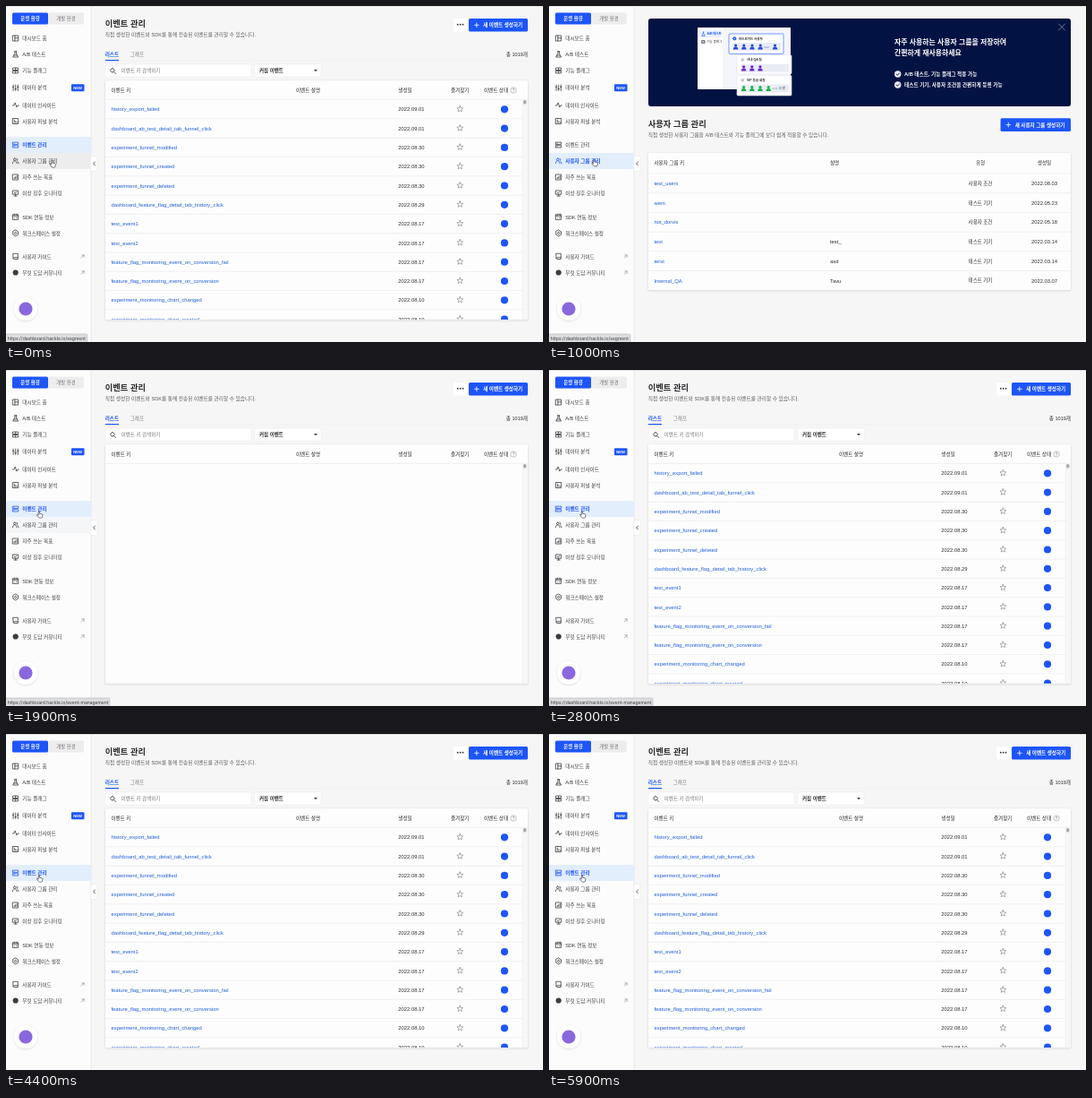
Animation, 600 px wide and 375 px high, one loop 6 s. Source, as an HTML page:

```html
<!DOCTYPE html>
<html lang="ko">
<head>
<meta charset="utf-8">
<style>
html, body { margin: 0; width: 100%; height: 100%; overflow: hidden; background: #f6f6f6; }
svg { display: block; width: 100vw; height: 100vh; }
text { font-family: "Liberation Sans", "Noto Sans CJK KR", "Noto Sans CJK", sans-serif; white-space: pre; }
.ui { font-family: Inter, sans-serif; }
.line { fill: none; stroke: currentColor; stroke-width: .8; stroke-linecap: round; stroke-linejoin: round; }
</style>
</head>
<body>
<svg id="stage" viewBox="0 0 600 375" xmlns="http://www.w3.org/2000/svg"></svg>
<script>
const BLUE = '#1d55f8', LINK = '#1f5fd8', INK = '#2b2b2f', GREY = '#77777c', NAVY = '#021242';
const stage = document.getElementById('stage');

const rect = (x, y, w, h, fill, r = 0, extra = '') =>
  `<rect x="${x}" y="${y}" width="${w}" height="${h}" rx="${r}" fill="${fill}" ${extra}/>`;
const dot = (x, y, r, fill, extra = '') => `<circle cx="${x}" cy="${y}" r="${r}" fill="${fill}" ${extra}/>`;
const line = (d, color, width = .8, extra = '') =>
  `<path class="line" d="${d}" style="color:${color};stroke-width:${width}" ${extra}/>`;
// y is the vertical middle of the text
const text = (x, y, s, { size = 5.65, fill = INK, bold = false, anchor = 'start', extra = '' } = {}) =>
  `<text x="${x}" y="${y + size * .36}" font-size="${size}" fill="${fill}" font-weight="${bold ? 700 : 400}" text-anchor="${anchor}" ${extra}>${s}</text>`;
const group = (id, content) => `<g id="${id}">${content}</g>`;
const rule = (x1, x2, y, color = '#e6e6e8') => line(`M${x1} ${y}H${x2}`, color, .6);
const plus = (x, y) => line(`M${x - 2.3} ${y}h4.6M${x} ${y - 2.3}v4.6`, '#fff', .8);

// Icon paths are centred on 0,0
const icons = {
  home: 'M-3-3h6v6h-6zM-.8-3v6M-.8-.2h3.8',
  flask: 'M-1.2-3.2h2.4M-.8-3.2v2.4L-3 3h6L.8-.8v-2.4M-1.8 1h3.6',
  flag: 'M-2.9-2.9h5.8v2.4h-5.8zM-2.9.5h5.8v2.4h-5.8zM0-2.9v2.4M0 .5v2.4',
  sliders: 'M-2.6-3.2v6.4M0-3.2v6.4M2.6-3.2v6.4M-3.4-1h1.6M-.8 1.2h1.6M1.8-1h1.6',
  pulse: 'M-3.3.5h1.5l1.3-3 1.7 5 1-2h1.4',
  chart: 'M-3-3h6v6h-6zM-1.4 1.6v-3M.1 1.6v-1.5M1.6 1.6v-.6',
  event: 'M-3-2.9h6v2.3h-6zM-3 .7h6v2.3h-6zM-1.7-1.8h.1M-1.7 1.8h.1',
  users: 'M-1-3a1.3 1.3 0 1 1-.01 0M-3.3 2.7c0-4 4.6-4 4.6 0M1.2-2.8a1.3 1.3 0 0 1 .3 2.4M2.1.3q1.3.7 1.3 2.4',
  goal: 'M-3-3h6v6h-6zM-1.4 1.5v-1M0 1.5v-2M1.5 1.5v-3',
  monitor: 'M-3-3h6v4.2h-6zM-1.6 3h3.2M0 1.2v1.8M-1.5-.8l1 .7 1.7-1.4',
  sdk: 'M-3-2.7h6v5.6h-6zM-3-1.2h6M-1.4-3.4v1.3M1.4-3.4v1.3M-1.5.8h.2M.8.8h.7',
  gear: 'M0-3.4L2.9-1.7v3.4L0 3.4-2.9 1.7v-3.4zM0-1.2a1.2 1.2 0 1 1-.01 0',
  book: 'M-2.6-3.2h5.2v6.2h-4.4a.9.9 0 0 1-.8-.9zM-2.6 2q0-.8.8-.8h4.4'
};
const menu = [
  [36, '대시보드 홈', 'home'], [54, 'A/B 테스트', 'flask'], [72, '기능 플래그', 'flag'],
  [91.3, '데이터 분석', 'sliders'], [110.5, '데이터 인사이트', 'pulse'], [128.5, '사용자 퍼널 분석', 'chart'],
  [155, '이벤트 관리', 'event'], [173, '사용자 그룹 관리', 'users'], [191, '자주 쓰는 목표', 'goal'],
  [209, '이상 징후 모니터링', 'monitor'], [235.5, 'SDK 연동 정보', 'sdk'], [253.5, '워크스페이스 설정', 'gear'],
  [279.5, '사용자 가이드', 'book'], [297.5, '무릿 도담 커뮤니티', '']
];

function menuItem([y, label, icon], i) {
  const mark = icon
    ? `<path class="line" transform="translate(10.7 ${y})" d="${icons[icon]}"/>`
    : dot(10.7, y, 3.1, 'currentColor');
  const arrow = y > 270 ? line(`M84 ${y + 1.6}l3.2-3.2M84.6 ${y - 1.6}h2.6v2.6`, '#88888c', .6) : '';
  return `<g id="item${i}" color="#3c3c40">${rect(0, y - 9, 95, 18, 'transparent')}${mark}` +
    text(18.3, y, label, { size: 5.6, fill: 'currentColor' }) + arrow + '</g>';
}

function sidebar() {
  return rect(0, 0, 95, 375, '#fcfcfc') + line('M95 0V375', '#e3e3e5', .7) +
    rect(47, 7.5, 40, 13, '#ededee', 1.5) + rect(7, 7.5, 40, 13, BLUE, 1.5) +
    text(27, 14, '운영 환경', { size: 5.4, fill: '#fff', bold: true, anchor: 'middle' }) +
    text(67, 14, '개발 환경', { size: 5.4, fill: GREY, anchor: 'middle' }) +
    menu.map(menuItem).join('') +
    rect(73, 87.3, 14.5, 8, BLUE, 1) +
    text(80.2, 91.3, 'NEW', { size: 4.2, fill: '#fff', bold: true, anchor: 'middle' }) +
    rect(94.6, 167.5, 7.4, 17, '#fff', 1.5, 'stroke="#e3e3e5" stroke-width=".5"') +
    line('M99.4 174l-1.8 2 1.8 2', '#333', .8) +
    dot(22, 338, 13, '#fff', 'filter="url(#shadow)"') + dot(22, 338, 7.6, '#8a67df');
}

function button(x, y, w, h, label, gap) {
  return rect(x, y, w, h, BLUE, 1.6) + plus(x + 8.8, y + h / 2) +
    text(x + gap, y + h / 2, label, { size: 5.55, fill: '#fff', bold: true });
}

const star = (x, y) => {
  const points = Array.from({ length: 10 }, (_, k) => {
    const a = k * Math.PI / 5 - Math.PI / 2, r = k % 2 ? 1.65 : 3.6;
    return `${(x + r * Math.cos(a)).toFixed(2)} ${(y + r * Math.sin(a)).toFixed(2)}`;
  });
  return line(`M${points.join('L')}Z`, '#77777c', .6);
};

const events = [
  ['history_export_failed', '09.01'], ['dashboard_ab_test_detail_tab_funnel_click', '09.01'],
  ['experiment_funnel_modified', '08.30'], ['experiment_funnel_created', '08.30'],
  ['experiment_funnel_deleted', '08.30'], ['dashboard_feature_flag_detail_tab_history_click', '08.29'],
  ['test_event1', '08.17'], ['test_event2', '08.17'],
  ['feature_flag_monitoring_event_on_conversion_fail', '08.17'],
  ['feature_flag_monitoring_event_on_conversion', '08.17'],
  ['experiment_monitoring_chart_changed', '08.10'], ['experiment_monitoring_chart_created', '08.10']
];

function eventRow([key, date], i) {
  const y = 115.3 + i * 21.3;
  return text(117.5, y, key, { size: 5.85, fill: LINK }) +
    text(438.3, y, '2022.' + date, { size: 5.85 }) +
    star(507.3, y - .3) + dot(557, y, 4.1, BLUE) + rule(111, 577, y + 10.6);
}

function eventPage() {
  const heads = [[117.5, '이벤트 키'], [324, '이벤트 설명'], [438.3, '생성일'], [497, '즐겨찾기'], [534, '이벤트 상태']];
  return text(110.7, 20, '이벤트 관리', { size: 9.3, bold: true }) +
    text(110.7, 32, '직접 생성한 이벤트와 SDK를 통해 전송된 이벤트를 관리할 수 있습니다.', { size: 5.68, fill: '#5c5c61' }) +
    rect(500, 14, 15, 14.5, '#fff', 1.6) + [504.7, 507.6, 510.5].map(x => dot(x, 20.7, .9, INK)).join('') +
    button(517, 14, 66, 14.5, '새 이벤트 생성하기', 16.2) +
    text(110.7, 54, '리스트', { size: 5.6, fill: BLUE, bold: true }) +
    text(138.8, 54, '그래프', { size: 5.5, fill: GREY }) +
    rule(111, 583, 61, '#ececee') + rect(111, 60, 15, 1.2, BLUE) +
    text(583, 54, '총 1019개', { size: 5.6, anchor: 'end' }) +
    rect(111, 65, 163, 14, '#fff', 1.5, 'stroke="#ebebed" stroke-width=".5"') +
    line('M119-.2m0 69.8a2.2 2.2 0 1 1-.01 0M120.7 73.5l2 2', INK, .8) +
    text(128.8, 72, '이벤트 키 검색하기', { size: 5.5, fill: '#77777c' }) +
    rect(278, 65, 74, 14, '#fff', 1.5, 'stroke="#ebebed" stroke-width=".5"') +
    text(283, 72, '커짐 이벤트', { size: 5.5, bold: true }) +
    '<path d="M344 71l2 2.3 2-2.3z" fill="#444"/>' +
    rect(111, 83.3, 472, 267, '#fdfdfd', 1.5, 'filter="url(#shadow)"') +
    heads.map(([x, s]) => text(x, 94, s, { size: 5.55 })).join('') +
    dot(567, 94, 3.2, 'none', 'stroke="#88888c" stroke-width=".5"') +
    text(567, 94.1, '?', { size: 4.6, fill: GREY, anchor: 'middle' }) +
    rule(111, 583, 104.4) + rect(577, 104.6, 6, 245.4, '#f7f7f7') +
    line('M577 104.6V350', '#e8e8e8', .4) + rect(578, 105, 3.4, 4.5, '#a9a9ac', 1.6) +
    `<g id="eventRows" clip-path="url(#tableClip)">${events.map(eventRow).join('')}</g>` +
    rule(111, 583, 350.3, '#dedee1');
}

const person = (x, y, color) =>
  dot(x, y - 1.6, 1.6, color) + `<path d="M${x - 2.7} ${y + 3}q0-3 2.7-3t2.7 3z" fill="${color}"/>`;
const ellipsis = (x, y, color) => [-2, 0, 2].map(d => dot(x + d, y, .55, color)).join('');
const check = (x, y, r, fill, mark) =>
  dot(x, y, r, fill) + line(`M${x - r * .4} ${y}l${r * .3} ${r * .35} ${r * .55} ${-r * .65}`, mark, r * .24);

function card(x, y, h, label, people, color, selected) {
  return rect(x, y, 61, h, '#fff', 1.2, `stroke="${selected ? BLUE : '#e4e6ee'}" stroke-width=".6"`) +
    check(x + 6.3, y + 5.3, 2.1, selected ? BLUE : '#d9dbe2', selected ? '#fff' : '#777') +
    text(x + 11, y + 5.3, label, { size: 3.5, bold: true }) +
    rect(x + 4, y + 10, 54, 9, '#e9ecf4', 1) +
    Array.from({ length: people }, (_, k) => person(x + 7.6 + k * 9.2, y + 14.6, color)).join('');
}

function banner() {
  const heading = { size: 7.9, fill: '#fff', bold: true }, point = { size: 5.65, fill: '#fff', bold: true };
  return rect(111, 14, 472, 98, NAVY, 3) + line('M569.5 20l7 7M576.5 20l-7 7', '#b4b9ca', .6) +
    rect(166, 24, 104, 69, '#fff', 1) + rect(194, 24, 76, 69, '#f4f6fb', 1) +
    rect(168, 27.3, 25, 7.6, '#e8efff', 1) +
    line('M172.3 29.2v1.3l-1.5 3h3.4l-1.5-3v-1.3z', BLUE, .6) +
    text(176.5, 31.1, 'A/B 테스트', { size: 3.4, fill: BLUE, bold: true }) +
    line('M171 38.5h3v3h-3zM171 40h3', INK, .6) + text(176.5, 40, '기능 플래그', { size: 3.4 }) +
    card(201, 31, 22.5, '안드로이드 사용자', 4, '#2447dc', true) +
    ellipsis(243, 46, '#2447dc') + person(252.5, 45.6, '#2447dc') +
    card(210, 54.8, 21, '사내 QA 팀', 3, '#6b22cc') +
    card(210, 77.5, 22.5, 'VIP 등급 회원', 4, '#18b04b') +
    ellipsis(252.5, 92, '#18b04b') + text(257.5, 92, '6 명', { size: 3.6 }) +
    text(386, 40, '자주 사용하는 사용자 그룹을 저장하여', heading) +
    text(386, 52, '간편하게 재사용하세요', heading) +
    check(389.7, 76, 3.7, '#e9ecf5', NAVY) + text(397, 76, 'A/B 테스트, 기능 플래그 적용 가능', point) +
    check(389.7, 88, 3.7, '#e9ecf5', NAVY) + text(397, 88, '테스트 기기, 사용자 조건을 간편하게 등록 가능', point);
}

const groups = [
  ['test_users', '', '사용자 조건', '08.03'], ['wem', '', '테스트 기기', '05.23'],
  ['not_dorvix', '', '사용자 조건', '05.18'], ['test', 'test_', '테스트 기기', '03.14'],
  ['terst', 'asd', '테스트 기기', '03.14'], ['Internal_QA', 'Tavu', '테스트 기기', '03.07']
];

function groupRow([key, note, kind, date], i) {
  const y = 197.9 + i * 21.7;
  return text(117.5, y, key, { size: 5.85, fill: LINK }) + text(314, y, note, { size: 5.85 }) +
    text(482, y, kind, { size: 5.5, anchor: 'middle' }) +
    text(553.5, y, '2022.' + date, { size: 5.85, anchor: 'middle' }) + rule(111, 583, y + 10.8);
}

function groupPage() {
  return banner() + text(110.7, 131.7, '사용자 그룹 관리', { size: 9.3, bold: true }) +
    text(110.7, 143.5, '직접 생성한 사용자 그룹을 A/B 테스트와 기능 플래그에 보다 쉽게 적용할 수 있습니다.', { size: 5.68, fill: '#5c5c61' }) +
    button(504.5, 125.3, 78.5, 14.7, '새 사용자 그룹 생성하기', 16.2) +
    rect(111, 164, 472, 153, '#fdfdfd', 1.5, 'id="groupTable" filter="url(#shadow)"') +
    text(117.5, 175, '사용자 그룹 키', { size: 5.55 }) + text(314, 175, '설명', { size: 5.55 }) +
    text(482, 175, '유형', { size: 5.55, anchor: 'middle' }) +
    text(553.5, 175, '생성일', { size: 5.55, anchor: 'middle' }) +
    rule(111, 583, 187) + group('groupRows', groups.map(groupRow).join(''));
}

stage.innerHTML = `<defs>
  <filter id="shadow" x="-20%" y="-20%" width="140%" height="150%">
    <feDropShadow dx="0" dy=".6" stdDeviation="1" flood-color="#000" flood-opacity=".16"/></filter>
  <clipPath id="tableClip"><rect x="111" y="104" width="472" height="246"/></clipPath></defs>` +
  rect(0, 0, 600, 375, '#f6f6f6') + group('eventPage', eventPage()) + group('groupPage', groupPage()) +
  sidebar() + rect(0, 0, 600, .8, '#e0e0e2') +
  group('status', rect(-2, 366, 92, 11, '#dcdddf', 1.6, 'id="bubble" stroke="#b9babd" stroke-width=".6"') +
    '<text id="url" class="ui" x="1.7" y="372.6" font-size="5" fill="#3a3a3d"></text>') +
  `<path id="hand" d="M-1.2-3.2q.7-.8 1.3 0v2.4l2.5.6q.9.3.8 1.2l-.5 2.5q-.2.6-.8.6h-2.3q-.5 0-.8-.5l-2-2.7q-.1-.8.8-.7l1 .8z"
    fill="#fff" stroke="#222" stroke-width=".6" stroke-linejoin="round"/>`;

const el = id => document.getElementById(id);
const show = (id, visible) => el(id).setAttribute('display', visible ? 'inline' : 'none');
const EVENT = 6, GROUP = 7;

function paintItem(i, active, hovered, fading) {
  const item = el('item' + i);
  item.setAttribute('color', active ? BLUE : '#3c3c40');
  item.querySelector('text').setAttribute('font-weight', active ? 700 : 400);
  item.querySelector('rect').setAttribute('fill',
    active ? '#e3eefc' : hovered ? '#ededee' : fading ? '#f5f6f8' : 'transparent');
}

function render(ms) {
  const t = Math.floor(ms / 100) * 100 % 6000;
  const onGroups = t >= 400 && t < 1900;
  const p = Math.min(1, Math.max(0, (t - 900) / 600));
  const ease = p * p * (3 - 2 * p);
  const x = 52 - 14.5 * ease, y = 176 - 16.2 * ease + (t >= 1900 ? 1.2 : 0);
  const hovered = y < 167 ? EVENT : GROUP;

  show('eventPage', !onGroups);
  show('groupPage', onGroups);
  show('eventRows', t < 400 || t >= 2000);
  show('groupRows', t >= 500);
  el('groupTable').setAttribute('height', t >= 500 ? 153 : 23);
  paintItem(EVENT, !onGroups, hovered === EVENT, t === 400);
  paintItem(GROUP, onGroups, hovered === GROUP, t === 1900);

  show('status', t < 4400);
  const wide = t >= 400 && t < 600;
  el('bubble').setAttribute('width', wide ? 204 : hovered === EVENT ? 118 : 93);
  el('url').textContent = 'https://dashboard.hackle.io/' + (hovered === EVENT ? 'event-management' : 'segment');
  el('hand').setAttribute('transform', `translate(${x} ${y})`);
}

const start = performance.now();
function tick() {
  render(performance.now() - start);
  requestAnimationFrame(tick);
}
render(0);
requestAnimationFrame(tick);
</script>
</body>
</html>
```
